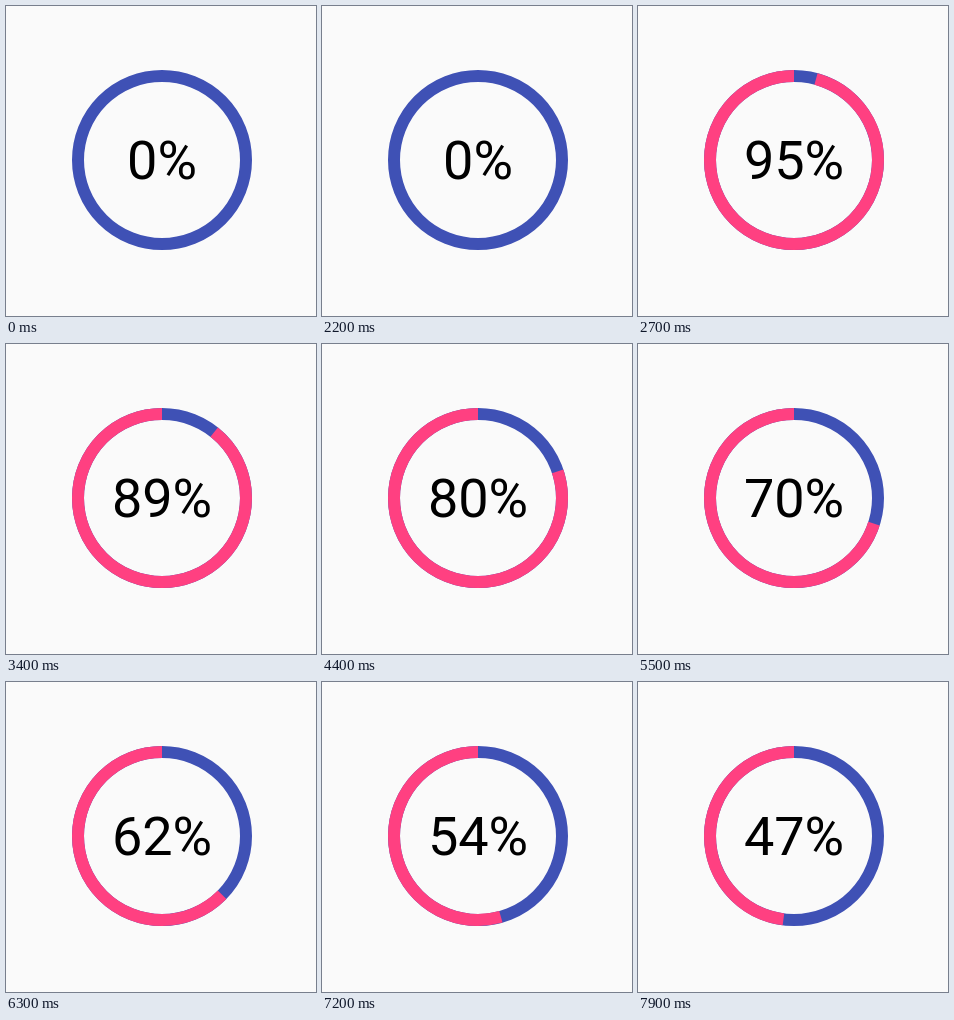
An HTML page for the animation above (8 s loop, 310x310 px).

```html
<!DOCTYPE html>
<html lang="en">
<head>
<meta charset="utf-8">
<title>Countdown ring</title>
<style>
  html, body { margin: 0; height: 100%; overflow: hidden; background: #fafafa; }
  svg { display: block; width: 100%; height: 100%; }
  circle { fill: none; stroke-width: 12; }
  text { font: 54px Roboto, sans-serif; text-anchor: middle; }
</style>
</head>
<body>
<svg viewBox="0 0 310 310">
  <g transform="translate(156 154)">
    <circle r="84" stroke="#3f51b5"/>
    <!-- mirrored, so the dash runs counter-clockwise from the top -->
    <circle id="bar" r="84" stroke="#ff4081" pathLength="100" transform="scale(-1 1) rotate(-90)"/>
    <text id="label" y="19"></text>
  </g>
</svg>
<script>
  const LOOP = 8000, STEP = 100, START = 2239, RATE = 0.00919; // ms, ms, ms, percent per ms
  const bar = document.getElementById('bar');
  const label = document.getElementById('label');

  function percentAt(time) {
    return time < START ? 0 : 100 - (time - START) * RATE;
  }

  function draw() {
    const time = Math.floor(performance.now() % LOOP / STEP) * STEP;
    const percent = percentAt(time);
    bar.setAttribute('stroke-dasharray', `${percent} 100`);
    bar.setAttribute('visibility', percent > 0 ? 'visible' : 'hidden');
    label.textContent = `${Math.floor(percent)}%`;
    requestAnimationFrame(draw);
  }
  draw();
</script>
</body>
</html>
```
